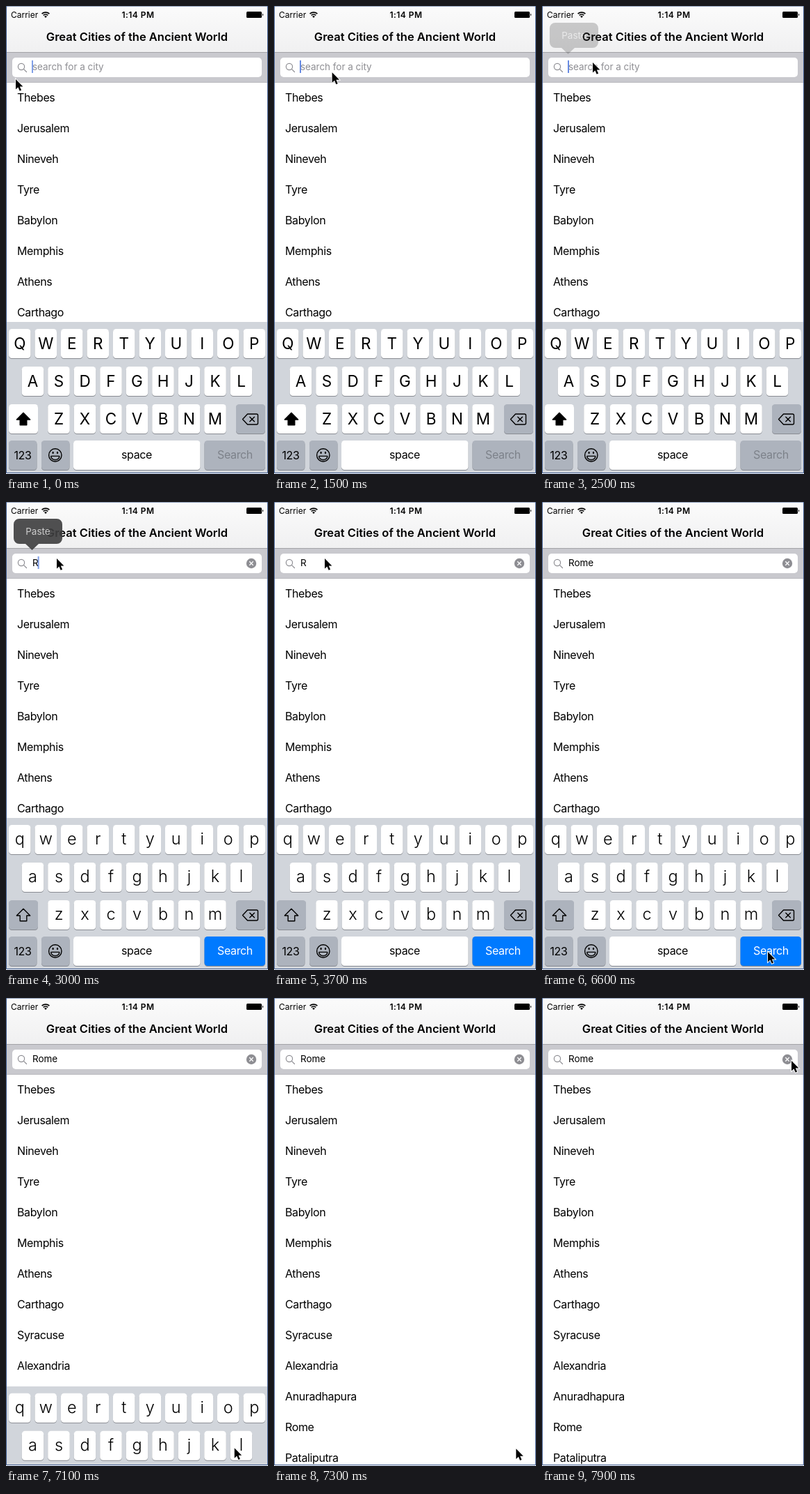
An HTML page that plays this animation: 377x671 px, repeating every 8000 ms.

```html
<!DOCTYPE html>
<html lang="en">
<head>
<meta charset="utf-8">
<title>City search</title>
<style>
  html, body { margin: 0; width: 100%; height: 100%; overflow: hidden; background: #fff; }
  svg { display: block; font-family: Inter, Roboto, "Liberation Sans", sans-serif; font-optical-sizing: none; }
  .mid { text-anchor: middle; }
  .title { font-size: 16.5px; font-weight: 600; }
  .status { font-size: 12px; }
  .clock { font-weight: 600; letter-spacing: .45px; }
  .field { font-size: 13.5px; letter-spacing: -.04px; }
  .row, .label { font-size: 16px; letter-spacing: -.38px; }
  .upper { font-size: 22.5px; }
  .lower { font-size: 23.5px; font-weight: 350; }
  .line { fill: none; stroke: #000; stroke-width: 1.4; stroke-linejoin: round; stroke-linecap: round; }
</style>
</head>
<body>
<svg width="377" height="671" viewBox="0 0 377 671">
  <defs>
    <linearGradient id="bar" x2="0" y2="1">
      <stop stop-color="#fbfbfb"/><stop offset="1" stop-color="#f0f0f1"/>
    </linearGradient>
  </defs>
  <rect width="377" height="671" fill="#fff"/>
  <g id="list"></g>

  <rect width="377" height="67" fill="url(#bar)"/>
  <rect y="66" width="377" height="44" fill="#c9c9ce"/>
  <rect y="66" width="377" height="1" fill="#a4a4a8"/>
  <rect y="109" width="377" height="1" fill="#b9b9be"/>
  <text class="status" x="7" y="16.5">Carrier</text>
  <g fill="none" stroke="#000" stroke-width="1.7">
    <path d="M51.6 11.2a7.8 7.8 0 0 1 10.8 0M53.7 13.4a4.8 4.8 0 0 1 6.6 0"/>
    <path d="M57 17l-1.9-2a2.7 2.7 0 0 1 3.8 0z" fill="#000" stroke="none"/>
  </g>
  <text class="status clock mid" x="190" y="16.5">1:14 PM</text>
  <rect x="346" y="8" width="22" height="9" rx="1.5"/>
  <path d="M369 10.7a2 2 0 0 1 0 3.6z"/>
  <text class="title mid" x="188.5" y="50">Great Cities of the Ancient World</text>

  <rect x="9" y="74" width="359" height="28" rx="5" fill="#fff"/>
  <g fill="none" stroke="#8e8e93" stroke-width="1.2" stroke-linecap="round">
    <circle cx="22" cy="87" r="4.6"/><path d="M25.4 90.4l4.1 4.1"/>
  </g>
  <text id="hint" class="field" x="38" y="92" fill="#8e8e93">search for a city</text>
  <text id="typed" class="field" x="38" y="92"></text>
  <rect id="caret" y="78" width="2" height="18" fill="#416fdc"/>
  <g id="clear">
    <circle cx="353" cy="88" r="7.2" fill="#8e8e93"/>
    <path d="M350.3 85.3l5.4 5.4m0-5.4l-5.4 5.4" stroke="#fff" stroke-width="1.3"/>
  </g>

  <g id="popup">
    <path d="M19 24H73a8 8 0 0 1 8 8V52a8 8 0 0 1-8 8H47L37.5 69L28 60H19a8 8 0 0 1-8-8V32a8 8 0 0 1 8-8z" fill="#3f3f40"/>
    <text class="mid" x="46" y="47" font-size="13.5" fill="#cacaca">Paste</text>
  </g>

  <g id="keyboard"></g>

  <rect y="670" width="377" height="1" fill="#fff"/>
  <path d="M0 .5H377" stroke="#8c9cb8"/>
  <path d="M.5 0V669.5H376.5V0" fill="none" stroke="#3d5a8e"/>
  <path id="mouse" d="M0 0V14.6L3.4 11.4L5.7 16.8L8.1 15.8L5.8 10.5H10.4Z" stroke="#fff" stroke-width="1.8" paint-order="stroke"/>
</svg>
<script>
const $ = id => document.getElementById(id);
const LOOP = 8000, STEP = 100;

const cities = ["Thebes", "Jerusalem", "Nineveh", "Tyre", "Babylon", "Memphis", "Athens",
  "Carthago", "Syracuse", "Alexandria", "Anuradhapura", "Rome", "Pataliputra"];
$("list").innerHTML = cities.map((c, i) =>
  `<text class="row" x="16" y="${137 + 44 * i}">${c}</text>`).join("");

// Keyboard
const WHITE = "#fff", GREY = "#adb3bd", BLUE = "#007aff";
const PITCH = 37.5, KEY = 31.5, TOP = 453, BOTTOM = 669;
const key = (x, y, w, fill = WHITE, id = "") =>
  `<rect x="${x}" y="${y + 1}" width="${w}" height="42" rx="4.5" fill="#898c92"/>` +
  `<rect id="${id}" x="${x}" y="${y}" width="${w}" height="42" rx="4.5" fill="${fill}"/>`;
const label = (cls, x, y, s, extra = "") =>
  `<text class="mid ${cls}" x="${x}" y="${y}" ${extra}>${s}</text>`;

// Letter rows are centred and 54 apart
const eachKey = draw => ["qwertyuiop", "asdfghjkl", "zxcvbnm"].map((chars, r) => {
  const left = 191.5 - PITCH * chars.length / 2;
  return [...chars].map((c, i) => draw(c, left + PITCH * i, TOP + 10 + 54 * r)).join("");
}).join("");
const letters = (cls, drop, form) =>
  `<g id="${cls}">${eachKey((c, x, y) => label(cls, x + KEY / 2, y + drop, form(c)))}</g>`;

$("keyboard").innerHTML =
  `<rect y="${TOP}" width="377" height="218" fill="#d1d5db"/>` +
  eachKey((c, x, y) => key(x, y, KEY)) +
  letters("upper", 29.3, c => c.toUpperCase()) +
  letters("lower", 28, c => c) +
  key(4, 571, 42, WHITE, "shift") +
  `<path id="arrow" class="line" d="M25 583.3L34.7 593H29.8V600.7H20.2V593H15.3Z"/>` +
  key(331, 571, 42, GREY) +
  `<path class="line" d="M347.5 585H360.5a2 2 0 0 1 2 2V598a2 2 0 0 1-2 2H347.5L340.5 592.5Z
    M350.8 589.2l6.6 6.6m0-6.6l-6.6 6.6"/>` +
  key(4, 623, 40.5, GREY) + label("label", 24, 650, "123") +
  key(51, 623, 40.5, GREY) +
  `<circle class="line" cx="70.8" cy="644" r="9.2"/>
   <ellipse cx="67.6" cy="640.5" rx="1.1" ry="1.7"/><ellipse cx="74" cy="640.5" rx="1.1" ry="1.7"/>
   <path class="line" d="M64.8 645.4H76.8a6 5.4 0 0 1-12 0z"/>` +
  key(97, 623, 182.5) + label("label", 188, 649.3, "space") +
  key(285.5, 623, 87.5, GREY, "go") + label("label", 329.5, 649.3, "Search", 'id="goText"');

// Motion
const ramp = (t, from, to) => Math.min(1, Math.max(0, (t - from) / (to - from)));
const ease = (t, from, to) => { const u = ramp(t, from, to); return u * u * (3 - 2 * u); };

const word = "Rome", strokes = [3000, 4100, 4600, 4900], dismissed = 7000;
const home = { x: 14, y: 105 };
const moves = [
  { from: 1300, to: 1600, x: 108, y: 92 },
  { from: 1600, to: 2000, x: 73, y: 81 },
  { from: 5300, to: 6300, x: 325, y: 645 },
  { from: 7000, to: 7500, x: 361, y: 647 },
  { from: 7600, to: 7900, x: 359, y: 90 }
];
const mouseAt = t => moves.reduce((p, m) => {
  const u = ease(t, m.from, m.to);
  return { x: p.x + (m.x - p.x) * u, y: p.y + (m.y - p.y) * u };
}, home);

// The blink restarts with each keystroke
function caretAlpha(t, lastStroke) {
  const phase = (t - lastStroke + 150) % 1000;
  return t < dismissed ? ramp(phase, 50, 200) - ramp(phase, 600, 850) : 0;
}

const set = (id, name, value) => $(id).setAttribute(name, value);
const show = (id, on) => set(id, "display", on ? "inline" : "none");

function render(t) {
  const done = strokes.filter(s => s <= t);
  const filled = done.length > 0;
  const mouse = mouseAt(t);
  $("typed").textContent = word.slice(0, done.length);
  show("hint", !filled);
  show("clear", filled);
  show("upper", !filled);
  show("lower", filled);
  set("shift", "fill", filled ? GREY : WHITE);
  $("arrow").style.fill = filled ? "none" : "#000";
  set("go", "fill", filled ? BLUE : GREY);
  set("goText", "fill", filled ? WHITE : "#7d828a");
  set("caret", "x", 37 + (filled ? $("typed").getComputedTextLength() : 0));
  set("caret", "opacity", caretAlpha(t, done.at(-1) ?? 0));
  set("popup", "opacity", ramp(t, 2400, 2800) - ramp(t, 2980, 3200));
  set("keyboard", "transform", `translate(0 ${(BOTTOM - TOP) * ease(t, 6910, 7300)})`);
  set("mouse", "transform", `translate(${mouse.x} ${mouse.y})`);
}

const start = performance.now();
function tick() {
  const t = (performance.now() - start) % LOOP;
  render(Math.floor(t / STEP) * STEP);
  requestAnimationFrame(tick);
}
tick();
</script>
</body>
</html>
```
